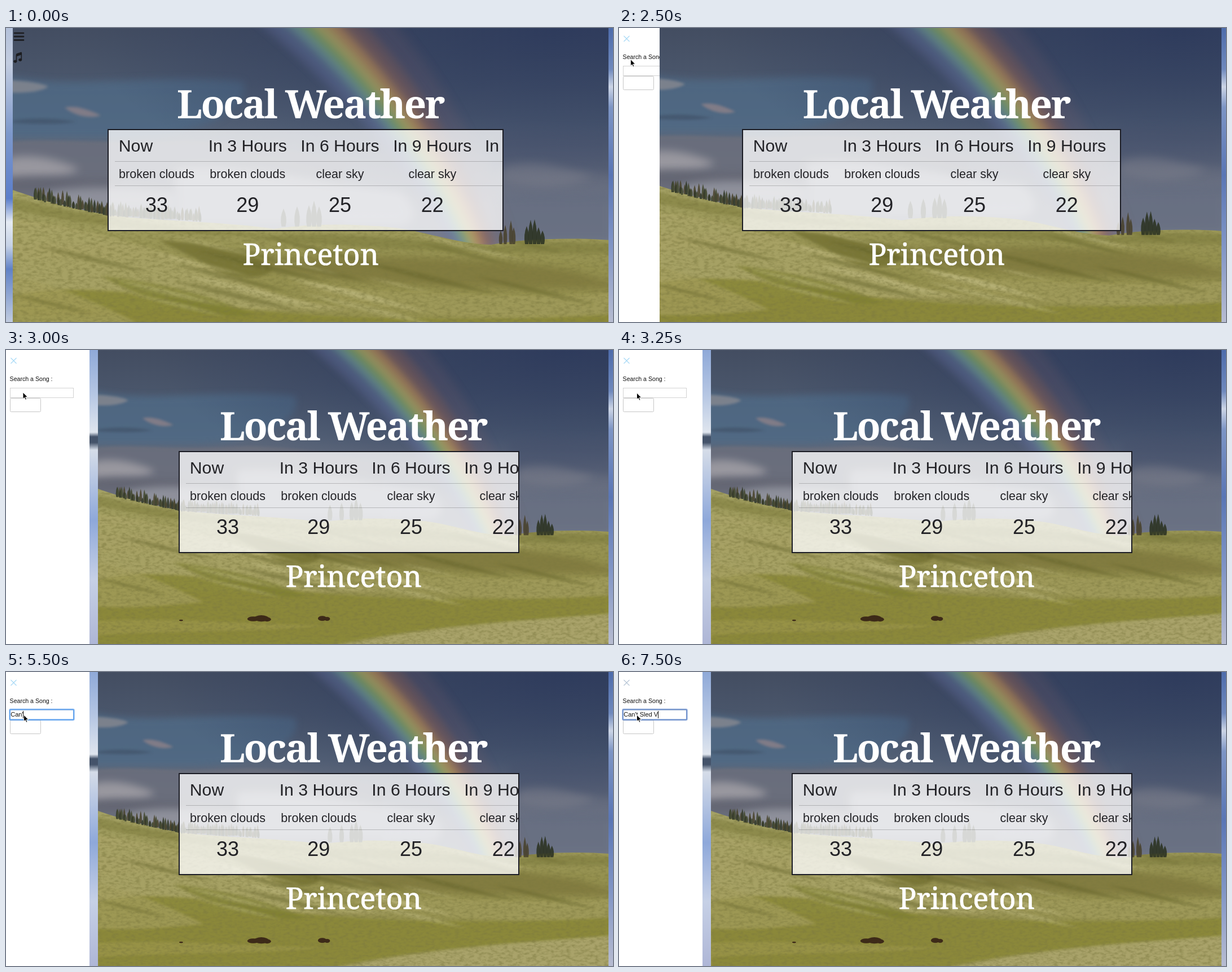
An HTML page that plays this animation: 1076 by 521 pixels, repeating every 8000 ms.

```html
<!DOCTYPE html>
<html lang="en">
<head>
<meta charset="utf-8">
<title>Local Weather</title>
<style>
  html, body { margin: 0; width: 100%; height: 100%; overflow: hidden; background: #fff; }
  svg { display: block; }
  #stage { position: absolute; left: 0; top: 0; }
  text { font-family: "Liberation Sans", Arial, sans-serif; fill: #222226; white-space: pre; }
  .head { font-family: "Noto Serif", serif; fill: #fff; text-anchor: middle; }
  .mid { text-anchor: middle; }
  .side { fill: #111; }
</style>
</head>
<body>
<svg id="stage" width="1076" height="521" viewBox="0 0 1076 521">
  <defs>
    <linearGradient id="skyA" x1="0" y1="0" x2="0" y2="1">
      <stop offset="0" stop-color="#b4c1da"/><stop offset=".12" stop-color="#c3cde0"/>
      <stop offset=".36" stop-color="#7d98cb"/><stop offset=".58" stop-color="#5b7ecb"/>
      <stop offset=".66" stop-color="#e6ebf3"/><stop offset=".74" stop-color="#c6d2e6"/>
      <stop offset=".82" stop-color="#6182c6"/><stop offset="1" stop-color="#c0cbdf"/>
    </linearGradient>
    <linearGradient id="skyB" x1="0" y1="0" x2="0" y2="1">
      <stop offset="0" stop-color="#8fa9d8"/><stop offset=".15" stop-color="#b5c6e3"/>
      <stop offset=".28" stop-color="#dfe5ee"/><stop offset=".295" stop-color="#44536a"/>
      <stop offset=".315" stop-color="#44536a"/><stop offset=".34" stop-color="#d5dce8"/>
      <stop offset=".58" stop-color="#8ea8da"/><stop offset=".78" stop-color="#c6d0e6"/>
      <stop offset="1" stop-color="#aeb6d6"/>
    </linearGradient>
    <linearGradient id="skyC" x1="0" y1="0" x2="0" y2="1">
      <stop offset="0" stop-color="#4e6cab"/><stop offset=".14" stop-color="#6f89bd"/>
      <stop offset=".2" stop-color="#ccd5e6"/><stop offset=".27" stop-color="#7d95c5"/>
      <stop offset=".5" stop-color="#5a76b5"/><stop offset=".75" stop-color="#8296c6"/>
      <stop offset="1" stop-color="#b7bcd1"/>
    </linearGradient>
    <linearGradient id="storm" x1="0" y1="0" x2="0" y2="1">
      <stop offset="0" stop-color="#434d61"/><stop offset=".22" stop-color="#4a566b"/>
      <stop offset=".45" stop-color="#576478"/><stop offset=".6" stop-color="#6a7080"/>
      <stop offset="1" stop-color="#7b8090"/>
    </linearGradient>
    <radialGradient id="dusk" cx=".92" cy="0" r=".8">
      <stop offset="0" stop-color="#26345a" stop-opacity=".72"/>
      <stop offset=".5" stop-color="#2c3a5c" stop-opacity=".5"/>
      <stop offset="1" stop-color="#2c3a5c" stop-opacity="0"/>
    </radialGradient>
    <linearGradient id="grass" x1="0" y1="0" x2="0" y2="1">
      <stop offset="0" stop-color="#a6a367"/><stop offset=".4" stop-color="#959150"/>
      <stop offset="1" stop-color="#989352"/>
    </linearGradient>
    <filter id="soft" x="-30%" y="-60%" width="160%" height="220%"><feGaussianBlur stdDeviation="8"/></filter>
    <filter id="mist" x="-30%" y="-30%" width="160%" height="160%"><feGaussianBlur stdDeviation="7"/></filter>
    <filter id="edge" x="-10%" y="-30%" width="120%" height="160%"><feGaussianBlur stdDeviation="2.5"/></filter>
    <filter id="glow" x="-10%" y="-50%" width="120%" height="200%"><feGaussianBlur stdDeviation=".6"/></filter>
    <filter id="tufts" x="0" y="0" width="100%" height="100%">
      <feTurbulence type="fractalNoise" baseFrequency=".1 .2" numOctaves="3" seed="4"/>
      <feColorMatrix values="0 0 0 0 .2  0 0 0 0 .19  0 0 0 0 .05  2.6 0 0 0 -1.05"/>
      <feComposite in2="SourceGraphic" operator="in"/>
    </filter>
    <path id="land" d="M12 287 C60 304 120 321 181 331 S400 344 475 356 C540 346 620 347 690 354 C750 362 800 383 860 384 C920 373 1000 371 1072 376 V625 H12 Z"/>
    <clipPath id="ground"><use href="#land"/></clipPath>
  </defs>

  <rect width="60" height="521" fill="url(#skyA)"/>
  <rect x="60" width="540" height="521" fill="url(#skyB)"/>
  <rect x="600" width="476" height="521" fill="url(#skyC)"/>

  <svg id="photo" height="521"><g id="scene">
    <rect x="12" width="1060" height="400" fill="url(#storm)"/>
    <g id="clouds"></g>
    <rect x="12" width="1060" height="400" fill="url(#dusk)"/>
    <g id="bow" filter="url(#mist)" fill="none" opacity=".72"></g>
    <use href="#land" fill="url(#grass)"/>
    <g id="slopes" clip-path="url(#ground)"></g>
    <use href="#land" filter="url(#tufts)" opacity=".5"/>
    <g id="trees"></g>
  </g></svg>

  <g fill="#1c1d20" stroke="#1c1d20">
    <path d="M15 9H31M15 15.2H31M15 21.4H31" stroke-width="2.7" stroke-linecap="round"/>
    <path d="M18.5 59V48L27.3 45V56" fill="none" stroke-width="1.6"/>
    <path d="M18.5 46L27.3 43V47L18.5 50Z" stroke-width="1"/>
    <ellipse cx="16.4" cy="59.2" rx="2.6" ry="2.1"/>
    <ellipse cx="25.2" cy="56.4" rx="2.6" ry="2.1"/>
  </g>

  <g id="heads">
    <text class="head" x="539.5" y="160" font-size="69" font-weight="700" letter-spacing="-2.6">Local Weather</text>
    <text class="head" x="540.5" y="420" font-size="52" font-weight="500" stroke="#fff" stroke-width=".7">Princeton</text>
  </g>

  <svg id="card" y="179" height="182">
    <rect id="pane" x="1" y="1" height="179" fill="#fff" fill-opacity=".77"/>
    <path d="M13 57.5H800M13 100.5H800" stroke="#000" stroke-opacity=".2"/>
    <g id="cells"></g>
    <rect id="frame" x="1" y="1" height="179" fill="none" stroke="#1b1c24" stroke-width="2"/>
  </svg>

  <svg id="side" height="521">
    <rect width="200" height="521" fill="#fff"/>
    <path id="close" d="M8.5 14L18.5 24M18.5 14L8.5 24" stroke-width="1.2"/>
    <text class="side" x="6.6" y="55" font-size="10.6">Search a Song :</text>
    <rect x="7.5" y="85.5" width="54" height="24" rx="2" fill="#fff" stroke="#c6c6c6"/>
    <rect x="7.5" y="67.5" width="112" height="17" fill="#fff" stroke="#d3d3d3"/>
    <g id="ring" fill="none">
      <rect x="6.5" y="66" width="114" height="19" rx="1.5" stroke-width="2.6" stroke-opacity=".5" filter="url(#glow)"/>
      <rect x="7" y="66.7" width="113" height="17.8" rx="1" stroke-width="1.8"/>
    </g>
    <text id="typed" class="side" x="8.3" y="79.3" font-size="11"></text>
    <rect id="caret" y="69" width="1" height="13" fill="#111"/>
  </svg>

  <path id="mouse" d="M0 0V11.6L2.7 9.2L4.5 13.3L6.4 12.5L4.6 8.5H8.3Z" fill="#000" stroke="#fff" stroke-width=".9"/>
</svg>

<script>
const $ = id => document.getElementById(id);

function set(el, attrs) {
  for (const k in attrs) el.setAttribute(k, attrs[k]);
  return el;
}

function add(parent, tag, attrs) {
  const el = document.createElementNS("http://www.w3.org/2000/svg", tag);
  parent.appendChild(set(el, attrs));
  return el;
}

let seed = 7;
const rnd = () => (seed = seed * 16807 % 2147483647) / 2147483647;
const mix = (a, b, f) => a + (b - a) * f;

function buildSky() {
  const cloud = (d, fill, opacity, blur = "soft") =>
    add($("clouds"), "path", { d, fill, opacity, filter: `url(#${blur})` });
  cloud("M0 85 C120 110 260 80 420 95 C440 150 330 195 200 195 H0Z", "#506b86", .8, "mist");
  cloud("M0 92 C30 94 60 96 75 104 C60 114 30 116 0 114Z", "#83868f", .85, "edge");
  cloud("M104 141 C125 136 150 146 168 155 C145 162 120 154 104 141Z", "#8d8188", .8, "edge");
  cloud("M12 164 C50 158 90 160 125 166 C90 172 50 170 12 168Z", "#43556c", .8, "edge");
  cloud("M0 204 C60 192 150 208 300 200 C420 198 520 215 600 240 V350 H0Z", "#6b6e7b", .9, "edge");
  cloud("M0 232 C40 220 90 232 130 250 C110 268 50 262 0 268Z", "#a8a5aa", .75);
  cloud("M0 268 C60 258 120 274 200 268 V288 H0Z", "#626470", .8);
  cloud("M60 296 C120 276 210 282 300 292 L300 325 H60Z", "#9799a3", .8);
  cloud("M300 250 C380 235 520 270 700 290 C740 330 720 350 690 352 H300Z", "#9fa2ae", .7);
  cloud("M862 190 C930 170 1010 190 1076 182 V260 C1000 240 930 270 862 250Z", "#566076", .7);
  cloud("M880 246 C940 228 990 250 1040 262 C1000 286 930 282 880 270Z", "#82848f", .75);
  cloud("M862 300 C940 285 1010 300 1076 290 V380 H862Z", "#666e81", .8);

  const hues = ["#626a9c", "#6c7fae", "#6f9c98", "#84b05f", "#c3b75a", "#c58f50", "#a46a51", "#7d5a56"];
  const path = f => `M${mix(446, 610, f)} -20 C${mix(580, 722, f)} 90 ${mix(725, 812, f)} 240 ${mix(800, 862, f)} 390`;
  add($("bow"), "path", { d: path(1.2), stroke: "#80606a", "stroke-width": 50, opacity: .25, filter: "url(#mist)" });
  hues.forEach((stroke, i) =>
    add($("bow"), "path", { d: path(i / 7), stroke, "stroke-width": 19, opacity: i < 2 ? .45 : i > 5 ? .6 : .85 }));
}

function buildLand() {
  const slope = (d, fill, opacity, blur = "edge") =>
    add($("slopes"), "path", { d, fill, opacity, filter: `url(#${blur})` });
  slope("M12 300 C120 330 300 356 470 366 C380 374 140 352 12 322Z", "#7f7d3c", .55);
  slope("M420 372 C560 358 700 372 860 388 C960 376 1010 380 1072 382 V400 C900 400 640 394 420 372Z", "#7c7a3e", .55);
  slope("M12 338 C120 350 280 390 400 440 S520 480 620 500 L12 500Z", "#aaa468", .85);
  slope("M270 376 C340 382 420 390 470 420 C480 446 410 446 380 432 C340 410 310 395 270 376Z", "#6f6d2f", .75);
  slope("M430 420 C560 396 760 404 900 416 S1040 446 1072 448 V462 C900 464 600 460 430 420Z", "#787139", .65, "mist");
  slope("M500 452 C700 470 900 480 1072 470 V512 C850 520 650 510 500 452Z", "#a19b5c", .8);
  slope("M12 474 C120 452 260 470 400 496 C600 520 880 520 1072 508 V550 C800 558 560 590 440 625 H12Z", "#8a8837", .9);
  slope("M12 440 C90 455 160 485 230 521 C150 530 60 535 12 530Z", "#a59f5e", .7);
  slope("M170 440 C260 450 360 470 440 510 C350 515 250 485 170 440Z", "#7e7f30", .7);
  slope("M12 560 C150 552 300 565 480 570 C330 585 150 580 12 590Z", "#a09a50", .6);
  slope("M470 625 C600 580 860 562 1072 545 V625Z", "#aaa46c", .95);

  // Folds running down the hillside, light and dark in turn
  for (let i = 0; i < 22; i++) {
    const x = rnd() * 900, y = 350 + rnd() * 130, w = 110 + rnd() * 160;
    slope(`M${x} ${y}Q${x + w / 2} ${y + w * .08} ${x + w} ${y + w * .24}Q${x + w / 2} ${y + w * .16} ${x} ${y}Z`,
      i % 2 ? "#c3bd85" : "#5f5e28", .45);
  }
}

function buildTrees() {
  const trees = $("trees");
  const tree = (x, base, h, fill, w) => add(trees, "path", { fill, opacity: .9,
    d: `M${x} ${base - h}Q${x + w * 1.5} ${base - h * .5} ${x + w * .7} ${base}H${x - w * .7}Q${x - w * 1.5} ${base - h * .5} ${x} ${base - h}Z` });
  for (let i = 0; i < 100; i++) {
    const x = mix(48, 345, i / 100) + rnd() * 4;
    const base = x < 181 ? 304 + (x - 60) * .22 : 331 + (x - 181) * .06;
    tree(x, base + rnd() * 3, 11 + rnd() * 16, ["#333a2a", "#454a32", "#4b4630"][i % 3], 2.5);
  }
  for (const [x, h] of [[492, 32], [516, 36], [537, 38], [546, 46], [555, 36]])
    tree(x, 352, h, "#4b5244", 5);
  for (const [x, h] of [[877, 24], [885, 34], [895, 42], [900, 30]])
    tree(x, 383, h, "#49432f", 3.4);
  for (const [x, h] of [[923, 32], [930, 43], [937, 44], [944, 30], [951, 24]])
    tree(x, 383, h, "#2d3423", 4.2);

  const bison = (cx, cy, rx, ry) => add(trees, "ellipse", { cx, cy, rx, ry, fill: "#3d2a18" });
  bison(333, 556, 12, 5);
  bison(350, 555, 15, 6.5);
  bison(362, 557, 8, 4.5);
  bison(476, 555, 9, 5);
  bison(486, 556, 6, 4);
  bison(184, 559, 4, 1.6);
}

function buildCells() {
  const cell = (str, x, y, size, cls = "mid") =>
    add($("cells"), "text", { x, y, "font-size": size, class: cls }).textContent = str;
  const cols = [
    [86, "", "broken clouds", 33],
    [247.3, "In 3 Hours", "broken clouds", 29],
    [411, "In 6 Hours", "clear sky", 25],
    [574.8, "In 9 Hours", "clear sky", 22],
    [746, "In 12 Hours", "clear sky", 20]
  ];
  cell("Now", 18.8, 40, 30.2, "");
  for (const [x, hour, sky, temp] of cols) {
    cell(hour, x, 40, 30.2);
    cell(sky, x, 87, 21.5);
    cell(temp, x, 147, 36);
  }
}

// Each list holds [start time, value...]; the last entry reached is in force.
const at = (list, t) => list.filter(e => e[0] <= t).pop();

const slide = [[0, 0, 0], [2500, 72, .3], [2750, 141, .828], [3000, 148, 1]];
const mouse = [[0, -50, -50], [500, 148, 5], [750, 62, 39], [1000, 18, 60], [1250, 17, 55],
  [2000, 19.5, 55], [2250, 20.5, 55.5], [3000, 30, 75], [3250, 31.5, 76]];
const song = "Can't Sled V";
const typing = [[0, 0], [4750, 1], [5000, 3], [5500, 4], [5750, 5], [6000, 6],
  [6250, 7], [6750, 9], [7000, 10], [7250, 11], [7500, 12]];

function draw(t) {
  const [, wide, push] = at(slide, t);
  const left = Math.round(12 + 151 * push), width = 1068 - left, k = width / 1056;
  set($("photo"), { x: left, width });
  set($("scene"), { transform: `scale(${k}) translate(-12 0)` });
  set($("heads"), { transform: `translate(${76 * push} 0)` });

  const x = Math.round(181 + 126 * push) - 1, w = Math.round(882 + 28 * push) - x;
  set($("card"), { x, width: w });
  set($("cells"), { transform: "translate(1 0)" });
  set($("pane"), { width: w - 2 });
  set($("frame"), { width: w - 2 });

  set($("side"), { width: wide, visibility: wide ? "visible" : "hidden" });
  set($("close"), { stroke: t < 7500 ? "#a9daf6" : "#b7c6d6" });
  set($("ring"), { stroke: t < 7500 ? "#5c9fee" : "#6a8dcb", visibility: t < 3750 ? "hidden" : "inherit" });

  const count = at(typing, t)[1], typed = $("typed");
  typed.textContent = song.slice(0, count);
  const end = count ? 8.3 + typed.getComputedTextLength() : 8;
  const lit = count > 0 || (t >= 3750 && t < 4250);
  set($("caret"), { x: Math.floor(end), visibility: lit ? "inherit" : "hidden" });

  const [, mx, my] = at(mouse, t);
  set($("mouse"), { transform: `translate(${mx} ${my})` });
}

buildSky();
buildLand();
buildTrees();
buildCells();

let shown = -1;
function tick() {
  const t = Math.floor(performance.now() % 8000 / 250) * 250;
  if (t !== shown) draw(shown = t);
  requestAnimationFrame(tick);
}
tick();
</script>
</body>
</html>
```
